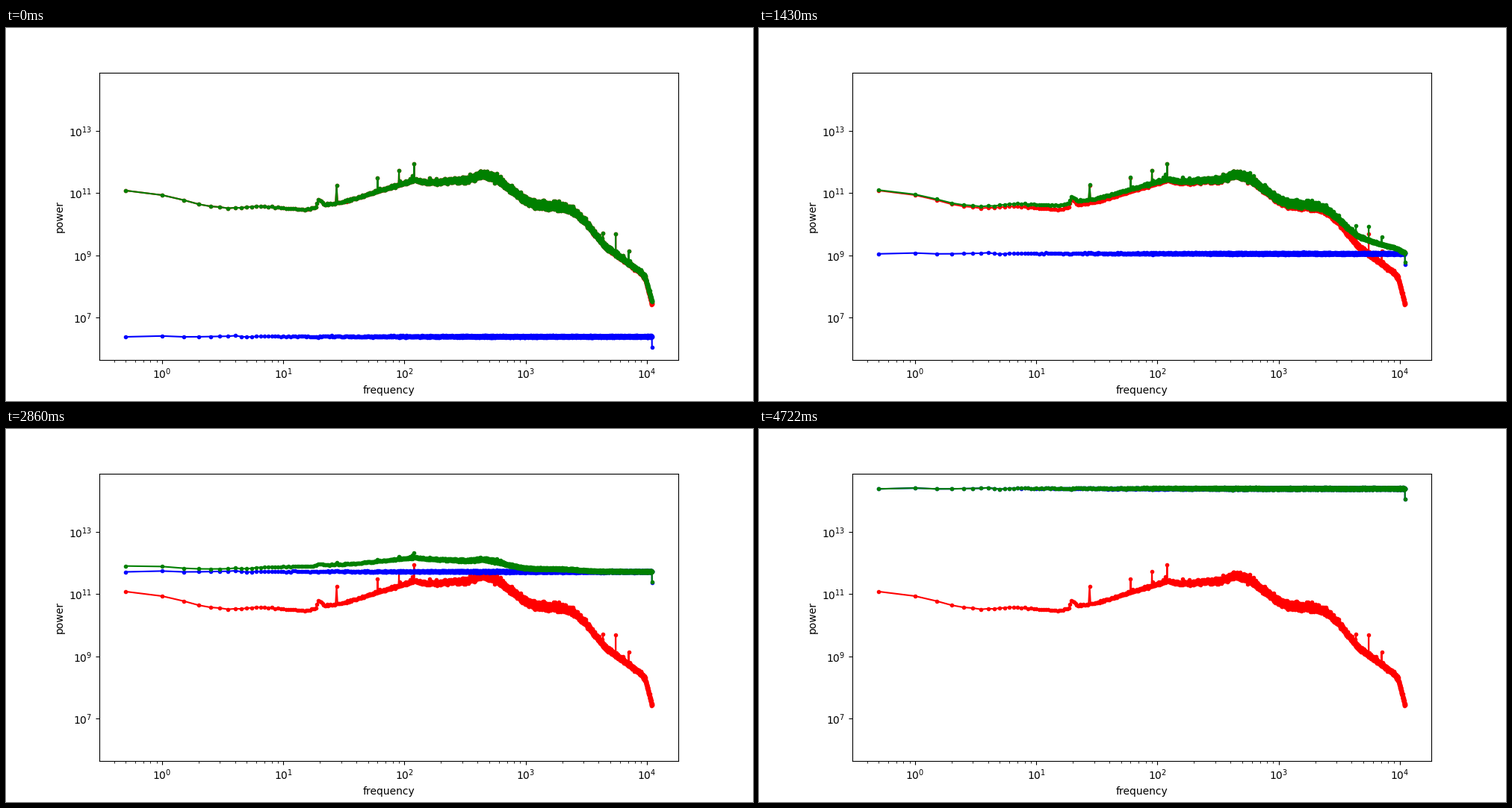
Recreate the animation shown at these times as a matplotlib script. Size 1000 by 500 pixels, loop 5010 ms.

```python
import numpy as np
import matplotlib.pyplot as plt
from matplotlib.animation import FuncAnimation
from matplotlib.ticker import NullLocator

STEPS = 7
INTERVAL_MS = 30
FRAMES = 167
FRAMES_PER_STEP = 24

rng = np.random.default_rng(4)

# Half-hertz bins, thinned evenly on the log axis where they overlap.
bins = np.unique(np.geomspace(1, 22050, 9700).round())
freq = bins / 2
logf = np.log10(freq)


def music_spectrum():
    """Power of the music: a few bends, rough scatter, and steady tones."""
    bends = np.array([
        (0.5, 11.09), (1, 10.94), (2, 10.64), (3.5, 10.52), (7, 10.58),
        (15, 10.47), (18.5, 10.54), (19.5, 10.82), (22, 10.63), (31, 10.72),
        (120, 11.42), (150, 11.34), (325, 11.43), (430, 11.61), (560, 11.51),
        (1000, 10.75), (1200, 10.64), (1800, 10.59), (2400, 10.47),
        (3100, 10.08), (4500, 9.30), (9000, 8.44), (9800, 8.20),
        (11025, 7.41)])
    level = np.interp(logf, np.log10(bends[:, 0]), bends[:, 1])
    scatter = 0.009 + 0.043 * np.exp(-((logf - 3) / 0.75) ** 2)
    level += scatter * rng.standard_normal(freq.size)
    skew = rng.exponential(0.018, freq.size) - 0.018
    level += np.where(freq > 19, skew, 0)
    for i, (_, peak) in zip(tone_bins, tones):
        level[i] = peak
    return 10 ** level


tones = [(27.5, 11.25), (60, 11.50), (90, 11.72), (120, 11.94),
         (4340, 9.71), (5525, 9.69), (7080, 9.14)]
tone_bins = [np.abs(freq - f).argmin() for f, _ in tones]
music = music_spectrum()

noise_shape = 10 ** (0.012 * rng.standard_normal(freq.size))
noise_shape[-1] = 0.45

# Loudness spread of the music over time (natural log units); tones are steadier.
spread = 1.75 + 1.25 * np.exp(-((logf - 1.62) / 0.87) ** 4)
spread[tone_bins] = 2.2
nodes, weights = np.polynomial.hermite_e.hermegauss(24)
weights /= weights.sum()


def noise_at(step):
    return 10 ** (6.395 + 4 / 3 * step) * noise_shape


def mix(noise):
    """Log-averaged power of music and noise together."""
    ratio = np.log(music / noise)
    gain = sum(w * np.logaddexp(0, ratio + spread * z)
               for z, w in zip(nodes, weights))
    return noise * np.exp(gain)


noises = [noise_at(step) for step in range(STEPS)]
mixes = [mix(noise) for noise in noises]

fig, ax = plt.subplots(figsize=(10, 5), dpi=100)
ax.set_xscale("log")
ax.set_yscale("log")
margin = 0.05 * np.ptp(logf)
ax.set_xlim(10 ** (logf[0] - margin), 10 ** (logf[-1] + margin))
ax.set_ylim(10 ** 5.64, 10 ** 14.87)
ax.set_yticks([1e7, 1e9, 1e11, 1e13])
ax.yaxis.set_minor_locator(NullLocator())
ax.set_xlabel("frequency")
ax.set_ylabel("power")

ax.plot(freq, music, ".-", color="red")
noise_line, = ax.plot(freq, noises[0], ".-", color="blue")
mix_line, = ax.plot(freq, mixes[0], ".-", color="green")


def draw(frame):
    step = (frame + 1) // FRAMES_PER_STEP
    noise_line.set_ydata(noises[step])
    mix_line.set_ydata(mixes[step])
    return noise_line, mix_line


anim = FuncAnimation(fig, draw, frames=FRAMES, interval=INTERVAL_MS,
                     repeat=True, repeat_delay=0)
plt.show()
```
